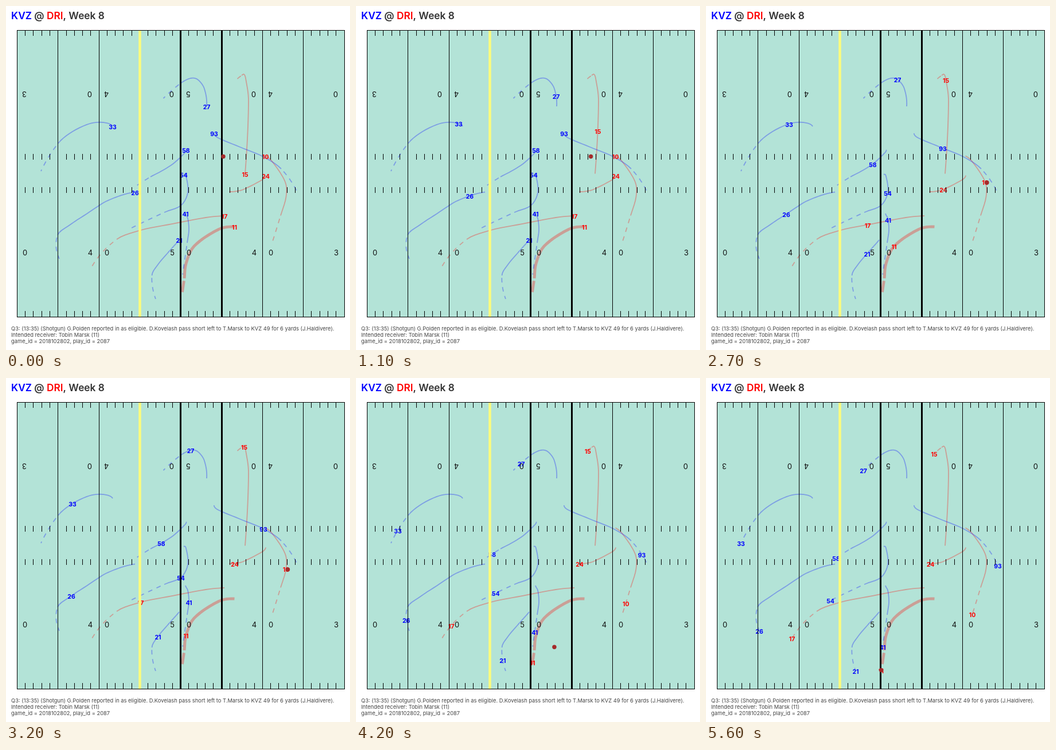
Animation, 600 px wide and 600 px high, one loop 5.7 s. Source, as an HTML page with a canvas:

```html
<!DOCTYPE html>
<html lang="en">
<head>
<meta charset="utf-8">
<title>Play tracking</title>
<style>
html, body { margin: 0; width: 100%; height: 100%; overflow: hidden; background: #fff; }
canvas { display: block; width: 600px; height: 600px; }
</style>
</head>
<body>
<canvas id="stage" width="600" height="600"></canvas>
<script>
const ctx = document.getElementById('stage').getContext('2d');
const FONT = 'Inter, "Open Sans", sans-serif';
const BLUE = '#0000ff', RED = '#ff0000';
const LOOP = 5700, STEP = 100;
const LEFT = 19.45, TOP = 42.5, WIDE = 571, HIGH = 500, YARD = 14.263;

// Moments of the play in seconds.
const SNAP = 1.1, THROW = 3.5, DASH = 3.7, CATCH = 4.4, END = 4.6;
const BEATS = [1.9, 2.7, 3.2, DASH, END];

const players = {};

// A route is one point for the start and one for each beat.
function player(number, color, start, route, width = 1.8) {
  const points = route.split(',').map(p => p.trim().split(' ').map(Number));
  const times = [start, ...BEATS];
  const at = t => [0, 1].map(axis => curve(times, points.map(p => p[axis]), t));
  players[number] = { number, color, width, at };
}

// Smooth curve through the points; whoever waits for the snap starts from rest.
function curve(times, values, t) {
  const last = times.length - 1;
  const rate = i => (values[i + 1] - values[i]) / (times[i + 1] - times[i]);
  const slope = i => {
    if (i === 0) return times[0] ? 0 : 2 * rate(0) - slope(1);
    if (i === last) return 2 * rate(last - 1) - slope(last - 1);
    return (values[i + 1] - values[i - 1]) / (times[i + 1] - times[i - 1]);
  };
  let i = 0;
  while (i < last - 1 && t > times[i + 1]) i++;
  const span = times[i + 1] - times[i];
  const u = Math.max(0, Math.min(1, (t - times[i]) / span)), v = 1 - u;
  return values[i] * (1 + 2 * u) * v * v + values[i + 1] * u * u * (1 + 2 * v)
    + span * u * v * (slope(i) * v - slope(i + 1) * u);
}

player(33, BLUE, 0, '186 210, 169 203, 145 205.5, 116 219, 91 239.5, 61 288');
player(27, BLUE, 0, '350 175, 345.5 143, 334 128, 322 126, 305 134.5, 274.5 161');
player(93, BLUE, SNAP, '363 222, 370 230, 413 248, 449 263, 480 284, 509 327');
player(58, BLUE, SNAP, '314 251, 312 256, 291 275.5, 271 288, 252 298, 227 314');
player(54, BLUE, SNAP, '310 294, 314 297, 317 326, 305 348, 276 360, 217 388');
player(26, BLUE, 0, '225 324.5, 175 340.5, 140 363, 114 380, 90 399.5, 93 441');
player(41, BLUE, SNAP, '313 362, 314 364.5, 317.5 372.5, 319 391, 316 413, 308 468.5');
player(21, BLUE, SNAP, '302 408, 297 414, 281 432, 265 451, 254.5 470, 261 511');
player(15, RED, 0, '417 292.5, 423 167, 418.5 129, 415.5 119.5, 411 121, 398 132');
player(10, RED, SNAP, '452.5 261.5, 464.5 271.5, 487 307, 488.5 333, 479 365.5, 464.5 412');
player(24, RED, SNAP, '453 295.5, 447 303, 414 320, 399 323.5, 391 324, 391.5 323.5');
player(17, RED, SNAP, '381 366, 348.5 369, 282 381.5, 235 391, 193 407, 150 454');
player(11, RED, SNAP, '398.5 385, 371 389.5, 328 419, 314 449, 311 475, 305.5 509.5', 5);

const passer = players[10], receiver = players[11];

function mix(a, b, u) {
  return a.map((v, i) => v + (b[i] - v) * Math.max(0, Math.min(1, u)));
}

function ballAt(t) {
  const held = ([x, y]) => [x + 3, y + 1];
  if (t < THROW) return mix([379, 262.5], held(passer.at(t)), (t - 0.9) * 2);
  if (t < CATCH) {
    return mix(passer.at(THROW), receiver.at(CATCH), (t - THROW) / (CATCH - THROW));
  }
  return receiver.at(t);
}

function line(x1, y1, x2, y2, color, width) {
  ctx.strokeStyle = color;
  ctx.lineWidth = width;
  ctx.beginPath();
  ctx.moveTo(x1, y1);
  ctx.lineTo(x2, y2);
  ctx.stroke();
}

function write(text, x, y, color, font, align = 'left') {
  ctx.font = font + ' ' + FONT;
  ctx.fillStyle = color;
  ctx.textAlign = align;
  ctx.fillText(text, x, y);
  return x + ctx.measureText(text).width;
}

function trail(p, from, to, dash) {
  ctx.save();
  ctx.globalAlpha = 0.3;
  ctx.strokeStyle = p.color;
  ctx.lineWidth = p.width;
  ctx.lineJoin = 'round';
  ctx.setLineDash(dash);
  ctx.beginPath();
  for (let t = from; t < to + 0.01; t += 0.1) ctx.lineTo(...p.at(t));
  ctx.stroke();
  ctx.restore();
}

function digit(text, x, y, turn) {
  ctx.save();
  ctx.translate(x, y);
  ctx.rotate(turn);
  write(text, 0, 4.7, '#111', '400 13px', 'center');
  ctx.restore();
}

function drawLines() {
  for (let yard = 1; yard < 40; yard++) {
    const x = Math.floor(LEFT + yard * YARD) + 0.5;
    if (yard % 5) {
      for (const y of [42, 258, 316, 532]) line(x, y, x, y + 10, '#000', 1);
    } else if (yard === 15) {
      line(x, 43, x, 542, '#fbfb7c', 4.5);
    } else {
      line(x, 43, x, 542, '#000', yard === 20 || yard === 25 ? 3 : 1);
    }
  }
  ctx.strokeStyle = '#000';
  ctx.lineWidth = 1;
  ctx.strokeRect(19.5, TOP, WIDE, HIGH);
  [...'04050403'].forEach((d, i) => {
    const x = 33 + Math.floor(i / 2) * 143 + (i % 2) * 114;
    digit(d, x, 430.5, 0);
    digit(d, 608 - x, 153.5, Math.PI);
  });
}

function drawText() {
  const big = '600 17.3px', ink = '#333';
  let x = write('KVZ', 9, 23, BLUE, big);
  x = write(' @ ', x, 23, ink, big);
  x = write('DRI', x, 23, RED, big);
  write(', Week 8', x, 23, ink, big);
  ['Q3: (13:35) (Shotgun) G.Polden reported in as eligible. D.Kovelash pass short left to T.Marsk to KVZ 49 for 6 yards (J.Haldivere).',
    'Intended receiver: Tobin Marsk (11)',
    'game_id = 2018102802, play_id = 2087'
  ].forEach((s, i) => write(s, 9, 566 + 11 * i, '#444', '400 9.35px'));
}

function draw(t) {
  const team = Object.values(players);
  ctx.fillStyle = '#fff';
  ctx.fillRect(0, 0, 600, 600);
  ctx.fillStyle = '#b3e3d7';
  ctx.fillRect(19.5, TOP, WIDE, HIGH);

  for (const p of team) {
    const dash = 4 * Math.max(2, p.width);
    trail(p, 0, DASH, []);
    trail(p, DASH + 0.1, END, [dash, dash]);
  }
  for (const p of team) {
    const [x, y] = p.at(t);
    write(p.number, x, y + 5.3, p.color, '700 10.5px', 'center');
  }
  drawLines();

  ctx.fillStyle = '#a52a2a';
  ctx.beginPath();
  ctx.arc(...ballAt(t), 3.7, 0, Math.PI * 2);
  ctx.fill();
  drawText();
}

const start = performance.now();
function tick() {
  const step = Math.floor((performance.now() - start) % LOOP / STEP);
  draw(Math.min(END, step / 10));
  requestAnimationFrame(tick);
}
tick();
</script>
</body>
</html>
```
